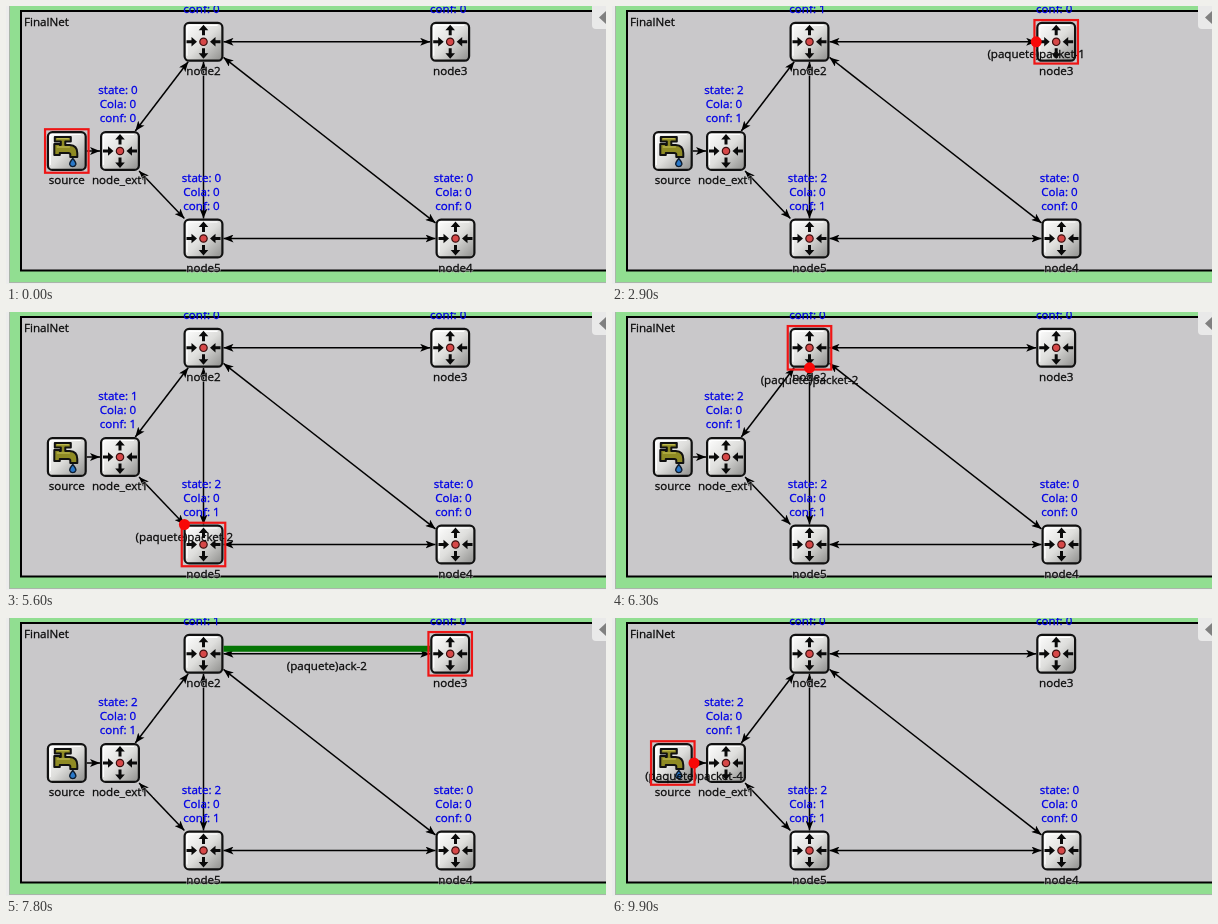
An HTML page that plays this animation: 600x278 px, repeating every 10000 ms.

```html
<!DOCTYPE html>
<html lang="es">
<head>
<meta charset="utf-8">
<title>FinalNet</title>
<style>
html, body { margin: 0; width: 100%; height: 100%; overflow: hidden; background: #91de91; }
svg { display: block; width: 600px; height: 278px; }
text { font: 11.6px "Open Sans", "Noto Sans", sans-serif; fill: #0c0c0c; stroke: #0c0c0c; stroke-width: .3px; }
.mid { text-anchor: middle; }
text.halo { fill: #c9c8ca; stroke: #c9c8ca; stroke-width: 2px; stroke-linejoin: round; opacity: .6; }
text.state { fill: #0000e6; stroke: #0000e6; }
</style>
</head>
<body>
<svg id="stage" viewBox="0 0 600 278">
  <defs>
    <linearGradient id="metal" x1="0" y1="0" x2="1" y2="1">
      <stop offset="0" stop-color="#fff"/>
      <stop offset=".5" stop-color="#dededc"/>
      <stop offset="1" stop-color="#8e8e8c"/>
    </linearGradient>
    <marker id="head" viewBox="0 0 10 8" refX="10" refY="4" markerWidth="10" markerHeight="8"
            markerUnits="userSpaceOnUse" orient="auto-start-reverse">
      <path d="M0 0 10 4 0 8 2.500 4Z"/>
    </marker>
    <g id="plate">
      <rect x="-18.9" y="-18.9" width="37.8" height="37.8" rx="4.5" fill="url(#metal)" stroke="#111" stroke-width="2.2"/>
      <path d="M-16.5 14V-14q0-2.5 2.5-2.5H14" fill="none" stroke="#fff" stroke-width="1.2"/>
    </g>
    <path id="arm" d="M-1.5-6.5V-11.5H-4.800L0-17 4.800-11.5H1.5V-6.5Z" fill="#0a0a0a"/>
    <path id="inArm" d="M-1.5-17V-12H-4.800L0-6.5 4.800-12H1.5V-17Z" fill="#0a0a0a"/>
    <g id="router">
      <use href="#plate"/>
      <use href="#arm"/>
      <use href="#arm" transform="rotate(180)"/>
      <use href="#inArm" transform="rotate(90)"/>
      <use href="#inArm" transform="rotate(-90)"/>
      <circle r="3.7" fill="#d64848" stroke="#3c1010" stroke-width="1.2"/>
    </g>
    <g id="tap">
      <use href="#plate"/>
      <path d="M-12-14H4V-9.500H-1.500V-6H3Q10.500-5.500 10.500 2V6H3.500V3.500Q3.500 2 1.500 2H-7V4H-12.500V-7H-7V-6H-6V-9.500H-12Z"
            fill="#8f8b24" stroke="#111" stroke-width="2" stroke-linejoin="round"/>
      <path d="M-10-12.300H2M-10-4H3" stroke="#c9c45a" stroke-width="1"/>
      <path d="M6 7.500Q9.500 11.500 9 13.500A3.200 3.200 0 0 1 3 13.500Q2.500 11.500 6 7.500Z" fill="#2a78c8" stroke="#0c1c30" stroke-width="1.4"/>
    </g>
  </defs>
  <rect width="600" height="278" fill="#91de91"/>
  <rect width="3" height="278" fill="#ececec"/>
  <path d="M3.500 0V276.500H600" fill="none" stroke="#a9b5a9"/>
  <rect y="277" width="600" height="1" fill="#ececec"/>
  <rect x="15" y="5" width="620" height="259.500" fill="#c9c8ca" stroke="#000" stroke-width="2"/>
  <text x="18" y="19.500">FinalNet</text>
  <g id="links" stroke="#000" stroke-width="1.5"></g>
  <g id="nodes"></g>
  <path id="bar" fill="none" stroke-width="6"/>
  <text id="msg" class="mid"></text>
  <rect id="active" width="43.5" height="43.5" fill="none" stroke="#ee1515" stroke-width="2.2"/>
  <circle id="dot" r="5.500"/>
  <path d="M586 0H600V23H590Q586 23 586 19Z" fill="#e9e9e9"/>
  <path d="M593 11.500 600 5V18Z" fill="#808080"/>
</svg>
<script>
const LOOP = 10000, STEP = 100, HALF = 20;
const NS = 'http://www.w3.org/2000/svg';
const $ = id => document.getElementById(id);

function add(parent, tag, attrs, text = '') {
  const el = document.createElementNS(NS, tag);
  set(el, attrs);
  el.textContent = text;
  parent.appendChild(el);
  return el;
}
function set(el, attrs) {
  for (const k in attrs) el.setAttribute(k, attrs[k]);
}

const nodes = {
  source: { x: 60.8, y: 145 },
  node_ext1: { x: 114, y: 145 },
  node2: { x: 197.5, y: 35.8 },
  node3: { x: 444.2, y: 35.8 },
  node4: { x: 449.5, y: 232.5 },
  node5: { x: 197.5, y: 232.5 }
};
const S = 'source', E = 'node_ext1', N2 = 'node2', N3 = 'node3', N4 = 'node4', N5 = 'node5';

// Point where the link from a to b leaves the icon of a
function port(a, b) {
  const p = nodes[a], q = nodes[b], dx = q.x - p.x, dy = q.y - p.y;
  const k = HALF / Math.max(Math.abs(dx), Math.abs(dy));
  return { x: p.x + dx * k, y: p.y + dy * k };
}

for (const [a, b] of [[S, E], [E, N2], [E, N5], [N2, N3], [N2, N5], [N2, N4], [N5, N4]]) {
  const p = port(a, b), q = port(b, a);
  const line = add($('links'), 'line', { x1: p.x, y1: p.y, x2: q.x, y2: q.y, 'marker-end': 'url(#head)' });
  if (a !== S) line.setAttribute('marker-start', 'url(#head)');
}

for (const id in nodes) {
  const n = nodes[id], g = $('nodes');
  add(g, 'use', { href: id === S ? '#tap' : '#router', x: n.x, y: n.y });
  for (const style of ['mid halo', 'mid']) {
    add(g, 'text', { x: n.x, y: n.y + 33, class: style }, id);
  }
  if (id !== S) {
    n.lines = [-57, -43, -29].map(dy =>
      add(g, 'text', { x: n.x - 2, y: n.y + dy, class: 'mid state' }));
  }
}

// start, kind, from, to, message, highlighted node when it differs
const steps = [
  [0, 'idle', S, S],
  [800, 'fly', S, E, 'packet-1'],
  [1400, 'bar', E, N5, 'packet-1'],
  [1600, 'drop', E, N5, 'packet-1'],
  [1800, 'bar', N5, N2, 'packet-1'],
  [2100, 'drop', N5, N2, 'packet-1'],
  [2300, 'bar', N2, N3, 'packet-1'],
  [2700, 'drop', N2, N3, 'packet-1'],
  [3000, 'fly', S, E, 'packet-2'],
  [3600, 'bar', N3, N2, 'ack-1'],
  [4000, 'bar', N3, N2, 'ack-1', N2],
  [4300, 'drop', N3, N2, 'ack-1'],
  [4500, 'bar', N2, N5, 'ack-1'],
  [4700, 'drop', N2, N5, 'ack-1'],
  [4900, 'bar', N5, E, 'ack-1'],
  [5100, 'drop', N5, E, 'ack-1'],
  [5200, 'bar', E, N5, 'packet-2'],
  [5500, 'drop', E, N5, 'packet-2'],
  [5800, 'bar', N5, N2, 'packet-2'],
  [6200, 'drop', N5, N2, 'packet-2'],
  [6400, 'bar', N2, N3, 'packet-2'],
  [6800, 'bar', N2, N3, 'packet-2', N5],
  [7400, 'drop', N2, N3, 'packet-2'],
  [7600, 'bar', N3, N2, 'ack-2'],
  [7900, 'drop', N3, N2, 'ack-2'],
  [8000, 'bar', N2, E, 'ack-2'],
  [8200, 'drop', N2, E, 'ack-2'],
  [8500, 'fly', S, E, 'packet-3'],
  [9100, 'bar', E, N5, 'packet-3'],
  [9400, 'drop', E, N5, 'packet-3'],
  [9700, 'idle', S, S],
  [9900, 'fly', S, E, 'packet-4']
];

// Per node: start and its state, queue and confirmation digits
const states = {
  [E]: [[0, '000'], [1400, '101'], [1600, '201'], [3600, '211'], [5200, '101'],
        [5800, '201'], [8300, '000'], [9100, '101'], [9400, '201']],
  [N2]: [[0, '000'], [2300, '201'], [4500, '000'], [6400, '201'], [8000, '000']],
  [N3]: [[0, '000']],
  [N4]: [[0, '000']],
  [N5]: [[0, '000'], [1800, '201'], [9500, '211']]
};

const latest = (list, t) => list.filter(e => e[0] <= t).pop();
const show = (el, on) => el.setAttribute('visibility', on ? 'visible' : 'hidden');

function draw(t) {
  const [start, kind, from, to, msg, focus] = latest(steps, t);
  const hot = nodes[focus || (kind === 'drop' ? to : from)];
  set($('active'), { x: hot.x - 21.75, y: hot.y - 21.75 });

  for (const id in states) {
    const v = latest(states[id], t)[1];
    ['state', 'Cola', 'conf'].forEach((key, i) => {
      nodes[id].lines[i].textContent = key + ': ' + v[i];
    });
  }

  const moving = kind !== 'idle';
  show($('bar'), kind === 'bar');
  show($('dot'), moving && kind !== 'bar');
  show($('msg'), moving);
  if (!moving) return;

  const ack = msg.startsWith('ack');
  const p = port(from, to), q = port(to, from);
  let at = q;
  if (kind === 'fly') at = { x: 82 + (t - start) / 50, y: p.y };
  if (kind === 'bar') {
    const dx = q.x - p.x, dy = q.y - p.y, k = 5 / Math.hypot(dx, dy);
    const ox = -dy * k, oy = dx * k;
    set($('bar'), {
      d: `M${p.x + ox} ${p.y + oy}L${q.x + ox} ${q.y + oy}`,
      stroke: ack ? '#057505' : '#f40c0c'
    });
    at = { x: (p.x + q.x) / 2, y: (p.y + q.y) / 2 };
  } else {
    set($('dot'), { cx: at.x, cy: at.y, fill: ack ? '#057505' : '#f80808' });
  }
  set($('msg'), { x: at.x, y: at.y + 16.5 });
  $('msg').textContent = '(paquete)' + msg;
}

function tick() {
  draw(Math.floor(performance.now() % LOOP / STEP) * STEP);
  requestAnimationFrame(tick);
}
tick();
</script>
</body>
</html>
```
